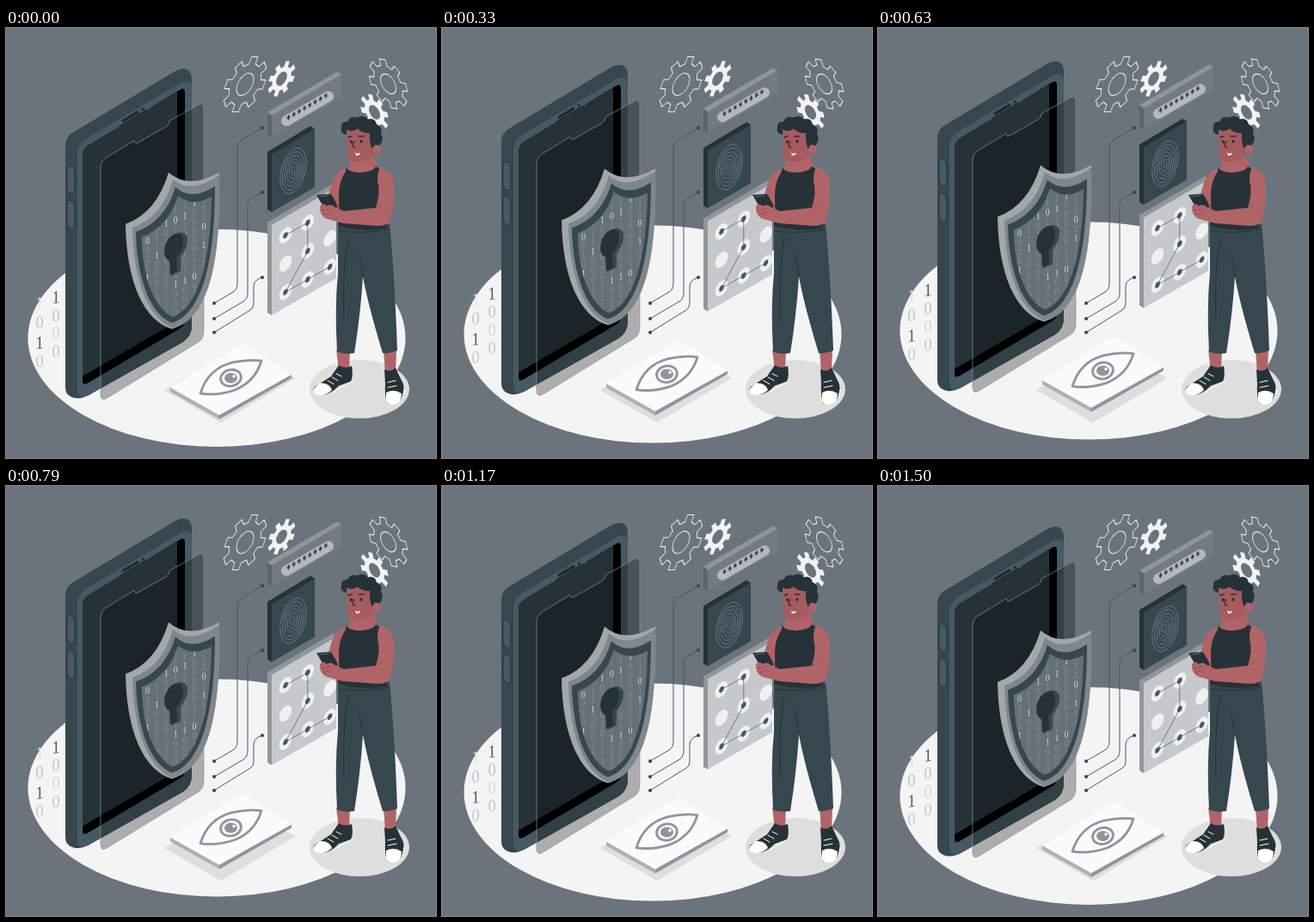
Animation of 500x500 px, one loop 1.54 s. Source, as an HTML page:

```html
<!DOCTYPE html>
<html lang="en">
<head>
<meta charset="utf-8">
<title>Mobile security</title>
<style>
  html, body { margin: 0; height: 100%; overflow: hidden; background: #6b737d; }
  svg { display: block; width: 100vw; height: 100vh; }
  text { font-family: "Liberation Serif", serif; text-anchor: middle; }
  .line { fill: none; stroke-linecap: round; stroke-linejoin: round; }
</style>
</head>
<body>
<svg viewBox="0 0 500 500">
  <g class="float">
    <ellipse cx="245" cy="360.500" rx="219.500" ry="126.500" fill="#f4f4f4"/>
  </g>
  <path d="M184 421L266 374L337 407L250 459Z" fill="#dedede"/>
  <ellipse cx="411" cy="420" rx="58" ry="34" fill="#dedede"/>
  <g id="gears"></g>

  <g class="float">
    <g id="looseDigits" font-size="21"></g>

    <g id="phone">
      <path d="M69 137Q69 127 77 122L197 50Q206 45 212 49Q216 52 216 60V346Q216 358 206 365L96 427Q84 433 76 429Q69 426 69 418Z" fill="#37474f"/>
      <path d="M83 147Q83 135 93 129L201 65Q215 57 216 70V346Q216 358 206 365L96 427Q83 433 83 420Z" fill="#455a64"/>
      <path d="M89 149Q89 141 95 137L128 117Q131 117 133 113L163 95Q167 96 169 92L202 72Q208 68 208 75V340Q208 346 203 349L95 413Q89 416 89 411Z"/>
      <path d="M89 149Q89 141 95 137L128 117Q131 117 133 113L163 95Q167 96 169 92L199 74V341L89 405Z" fill="#263238"/>
      <path d="M136 108L153 98M159 94.500h.1" class="line" stroke="#1c262c" stroke-width="3"/>
      <g fill="#455a64" stroke="#263238">
        <path d="M71 166Q71 160 75 160Q80 162 80 170V187Q80 193 76 193Q71 191 71 184Z"/>
        <path d="M71 206Q71 200 75 200Q80 202 80 210V228Q80 234 76 234Q71 232 71 225Z"/>
      </g>
    </g>

    <path d="M110 164Q110 155 116 151L149 131Q150 136 154 133L186 115Q190 113 190 108L224 89Q230 86 230 94V352Q230 361 224 365L118 430Q110 435 110 426Z"
          fill-opacity=".29" stroke="#8b9399" stroke-width=".7"/>

    <g id="shield">
      <path d="M139 228Q175 215 189 168Q212 188 248 168C250 260 240 337 193 350C160 340 140 295 139 228Z" fill="#a3a7ab"/>
      <path d="M147 232Q182 220 194 176Q215 194 248 171C250 260 240 337 194 349C166 338 148 295 147 232Z" fill="#7f868d"/>
      <path d="M151 237Q185 225 197 185Q216 202 243 184C243 265 230 332 193 343C168 333 152 292 151 237Z" fill="#37474f"/>
      <clipPath id="face"><path d="M158 243Q189 231 200 195Q217 209 239 196C238 265 226 324 194 336C172 326 158 288 158 243Z"/></clipPath>
      <g clip-path="url(#face)">
        <path d="M150 190H250V350H150Z" fill="#667079"/>
        <g id="shieldDigits" font-size="11.500" fill="#e2e5e7"></g>
      </g>
      <path d="M185 262Q184 248 194 241Q206 233 211 243Q212 256 203 266V283L192 288L191 271Q186 269 185 262Z" fill="#37474f"/>
      <path d="M184 261Q184 248 193 241Q203 235 206 245Q207 257 198 267L199 283L191 287L190 271Q185 269 184 261Z" fill="#263238"/>
    </g>

    <g id="panels">
      <path d="M304 98L309 102V126L304 124Z" fill="#5c636a"/>
      <path d="M304 98L385 51L390 54L309 102Z" fill="#90959a"/>
      <path d="M309 102L390 54V81L309 126Z" fill="#737a82"/>
      <path d="M326 108L375 79.500" class="line" stroke="#b5b9bd" stroke-width="12"/>
      <g id="stars" class="line" stroke="#263238" stroke-width="1"></g>

      <path d="M304 144L354 114L359 117L309 214L304 211Z" fill="#263238"/>
      <path d="M309 147L359 117V185L309 214Z" fill="#37474f"/>
      <g id="print" class="line" stroke="#76848c" stroke-width=".8" transform="matrix(.87 -.5 0 1 334 166)"></g>

      <path d="M304 226L380 181L384 184L309 334L304 331Z" fill="#90969b"/>
      <path d="M309 229L384 185V291L309 334Z" fill="#c6c9cc"/>
      <g id="pattern"></g>
    </g>

    <g id="card">
      <path d="M191 418L248 450V455L191 423Z" fill="#aeb1b4"/>
      <path d="M248 450L332 403V407L248 455Z" fill="#90959a"/>
      <path d="M191 418L275 367L332 403L248 450Z" fill="#fbfbfb"/>
      <g class="line" stroke="#90959b" stroke-width="2.800">
        <path d="M226 425Q235 396 263 389Q281 385 297 387Q290 411 266 421Q246 428 226 425Z"/>
        <ellipse cx="261.500" cy="407" rx="12" ry="9.500" transform="rotate(-12 261 407)"/>
      </g>
      <ellipse cx="261.500" cy="407" rx="7.500" ry="6" fill="#90959b"/>
      <circle cx="265" cy="405" r="1.800" fill="#fbfbfb"/>
    </g>
  </g>

  <g class="line" stroke="#455a64">
    <path d="M298 116L273 131Q269 133 269 138V297Q269 304 264 307L242 320"/>
    <path d="M298 191L285 198Q281 200 281 205V308Q281 315 276 318L242 338"/>
    <path d="M298 290L293 292Q288 295 288 300V320Q288 326 284 328L242 354"/>
    <path d="M298 116h.1M298 191h.1M298 290h.1M242 320h.1M242 338h.1M242 354h.1" stroke="#37474f" stroke-width="4"/>
  </g>

  <g id="person">
    <g fill="#b16467">
      <path d="M384 374H400L399 398H387ZM439 374H454L453 402H441Z"/>
      <path d="M396 163Q384 166 379 180L373 200L374 216L388 214L394 190Z"/>
      <path d="M401 148H428L433 165Q414 178 398 165Z"/>
    </g>
    <g fill="#263238">
      <path d="M387 392Q394 397 402 393Q404 405 401 411L387 416Q376 428 363 427Q355 424 358 418L378 405Z"/>
      <path d="M440 397Q447 401 453 395Q457 404 462 414Q464 424 459 432Q452 439 443 436Q440 424 441 414Z"/>
    </g>
    <g fill="#fff">
      <path d="M365 413Q376 412 379 421Q371 428 363 427Q355 425 358 419Z"/>
      <path d="M442 424Q451 419 460 425Q460 434 454 437Q446 440 442 434Z"/>
    </g>
    <path class="line" stroke="#fff" stroke-width="1" d="M374 410L381 414M379 406L386 410M384 402L390 405M444 418L454 416M444 412L453 410M381 423L402 411M461 430L463 420"/>
    <path d="M386 227L446 228Q452 290 455 375Q447 379 438 378Q421 322 415 289Q412 335 405 378Q392 380 385 376Q382 325 386 285Z" fill="#37474f"/>
    <path class="line" stroke="#263238" stroke-width="1" d="M387 236Q415 240 446 234M415 289Q413 270 409 262M398 244Q391 280 393 340"/>
    <path d="M396 162Q398 168 413 168Q427 167 430 161L435 164Q432 190 440 208L443 233Q412 238 386 230Q388 212 387 195Q387 181 392 172Q395 168 396 162Z" fill="#263238"/>
    <path d="M361 194L377 193Q380 194 386 208L372 213Z" fill="#263238"/>
    <path d="M364 196L375 195" class="line" stroke="#56656e"/>
    <path d="M435 162Q450 166 451 182Q452 202 447 222Q444 231 431 230L392 227Q380 224 373 222Q364 218 365 207Q369 203 373 207Q378 204 382 208L393 213L430 209Q436 190 432 178Q432 167 435 162Z" fill="#b16467"/>
    <path class="line" stroke="#8e474c" stroke-width=".8" d="M367 212L377 210M369 217L378 214M430 209L437 205"/>

    <path d="M397 118Q394 148 400 153Q407 159 421 153Q427 148 429 143L431 120L413 110Z" fill="#a65b5e"/>
    <ellipse cx="431" cy="141" rx="5" ry="6" fill="#b16467"/>
    <path d="M396 124Q388 123 390 115Q390 108 397 109Q400 102 408 104Q416 100 421 106Q429 104 431 112Q439 115 436 123Q440 130 434 137Q428 133 426 141Q422 133 423 122Q414 123 409 117Q402 122 396 118Z" fill="#263238"/>
    <g class="line" stroke="#263238" stroke-width="1.300">
      <path d="M398 127L402 126M410 126L416 126M405 132Q401 139 406 139"/>
      <path stroke-width="3" d="M401.500 132v.8M413 131.500v.8"/>
    </g>
    <path d="M406 145Q409 147 412 145Q411 149 407 148Z" fill="#fff"/>
  </g>
</svg>
<script>
const PERIOD = 1540, TRAVEL_TIME = 1500, LIFT = 10;
const add = (id, markup) => document.getElementById(id).innerHTML += markup;
const range = (n, fn) => Array.from({ length: n }, (_, i) => fn(i)).join('');

function gear(x, y, radius, slope, solid) {
  const at = (r, a) => `${(r * Math.cos(a)).toFixed(2)} ${(r * Math.sin(a)).toFixed(2)}`;
  const valley = solid ? .7 : .75;
  const teeth = range(8, i => {
    const a = (i + .6) * Math.PI / 4;
    return [[valley, -.23], [1, -.16], [1, .16], [valley, .23]]
      .map(([r, d]) => at(r * radius, a + d)).join('L') + 'L';
  }).slice(0, -1);
  const h = radius * .4;
  const hole = `M${h} 0A${h} ${h} 0 1 0 ${-h} 0A${h} ${h} 0 1 0 ${h} 0Z`;
  const paint = solid ? 'fill="#f2f2f2" fill-rule="evenodd"' : 'fill="none" stroke="#f2f2f2"';
  add('gears', `<path d="M${teeth}Z${hole}" ${paint} transform="matrix(.866 ${slope} 0 1 ${x} ${y})"/>`);
}
gear(278, 65.5, 29, -.5);
gear(320.5, 59, 18.5, -.5, true);
gear(444.5, 65, 26, .5);
gear(428.5, 98, 19, .5, true);

const digit = (char, x, y, style) =>
  `<text transform="matrix(.87 -.12 0 1 ${x} ${y})" ${style}>${char}</text>`;

[[39, 327, 1, '#e2e2e2'], [39, 349, 0, '#c4c4c4'], [39, 373, 1, '#4d565c'], [39, 394, 0, '#c9c9c9'],
 [58, 320, 1, '#4d565c'], [58, 341, 0, '#c4c4c4'], [58, 362, 0, '#d5d5d5'], [58, 383, 0, '#c9c9c9']]
  .forEach(([x, y, char, color]) => add('looseDigits', digit(char, x, y, `fill="${color}"`)));

let seed = 11;
const random = () => (seed = seed * 16807 % 2147483647) / 2147483647;
const bright = { '0,4': 0, '0,8': 1, '1,6': 1, '2,3': 1, '3,3': 0, '3,10': 1, '4,3': 1, '4,10': 1, '5,2': 1, '5,10': 0, '6,5': 0, '6,7': 1 };
add('shieldDigits', range(7, col => range(15, row => {
  const key = `${col},${row}`, faint = random() < .5 ? 0 : 1;
  const lit = key in bright;
  return digit(lit ? bright[key] : faint, 164.5 + col * 10.9, 208 - col * 4.5 + row * 10.7, `opacity="${lit ? .9 : .25}"`);
})));

add('stars', range(8, i => {
  const x = 328.5 + i * 6.2, y = 104 - i * 3.6;
  return `<path d="M${x} ${y - 2.5}v5M${x - 1.9} ${y - .4}l3.800 .8M${x - 1.3} ${y + 1.8}l2.600 -3.600"/>`;
}));

add('print', range(6, i => {
  const rx = 2 + i * 3.1, ry = 5 + i * 4;
  return `<ellipse rx="${rx}" ry="${ry}" stroke-dasharray="${12 + i * 7} 2.500 ${5 + i * 3} 2"/>`;
}));

const node = (col, row) => [325 + col * 25.8, 241 + row * 33 - col * 14.7];
const route = [[0, 0], [1, 0], [1, 1], [0, 2], [1, 2], [2, 2]].map(([col, row]) => node(col, row));
const dot = ([x, y], r, color) => `<circle r="${r}" fill="${color}" transform="matrix(.87 -.5 0 1 ${x} ${y})"/>`;
add('pattern',
  range(9, i => dot(node(i % 3, Math.floor(i / 3)), 8.5, '#f0f0f0')) +
  `<polyline points="${route}" class="line" stroke="#58656d" stroke-width=".8"/>` +
  route.map(p => dot(p, 3.3, '#455a64')).join(''));

const floating = document.querySelectorAll('.float');
function draw() {
  const t = Math.min(performance.now() % PERIOD, TRAVEL_TIME);
  const y = -LIFT * (1 - Math.abs(1 - 2 * t / TRAVEL_TIME));
  floating.forEach(g => g.setAttribute('transform', `translate(0 ${y.toFixed(3)})`));
  requestAnimationFrame(draw);
}
draw();
</script>
</body>
</html>
```
